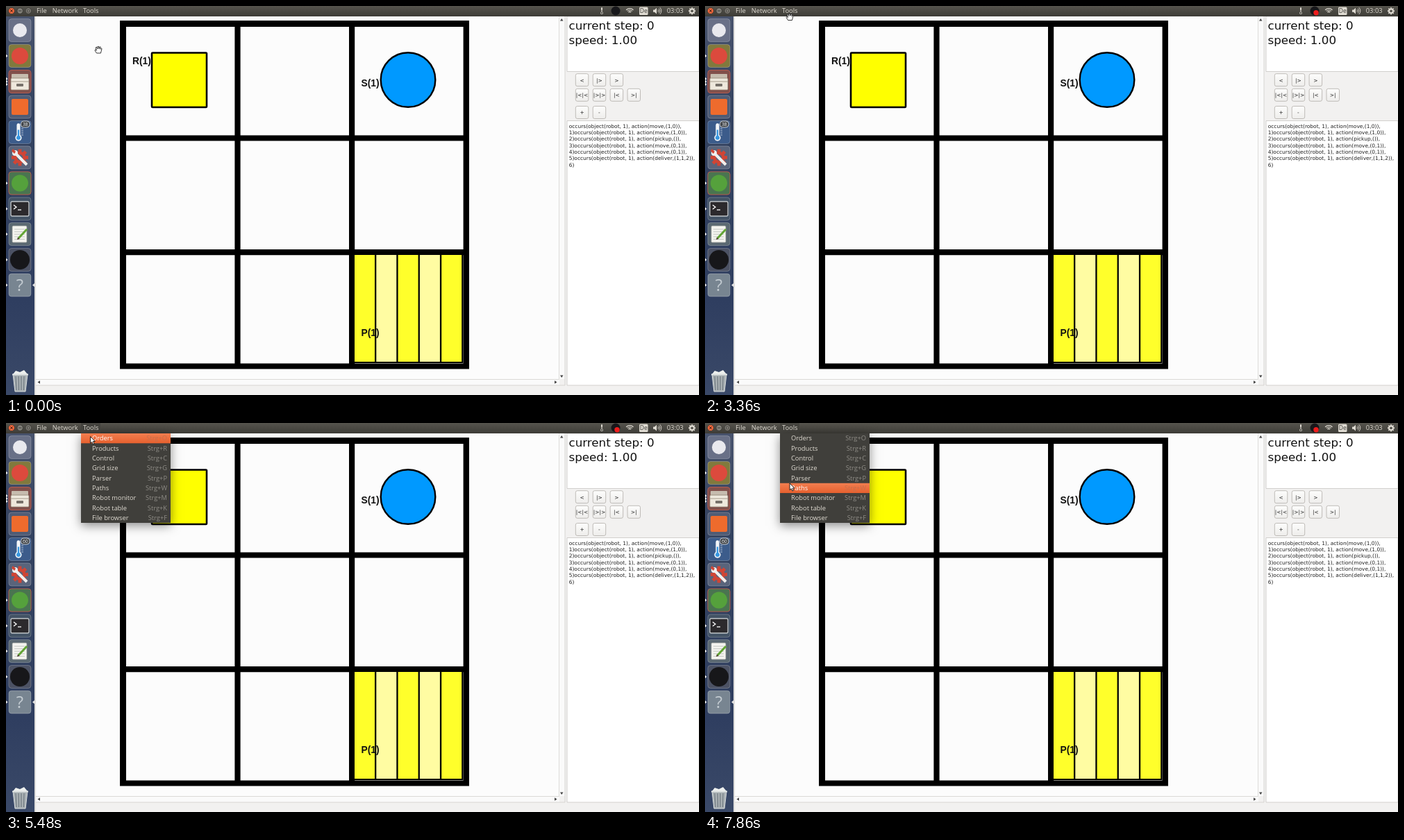
Animation, 998 px wide and 561 px high, one loop 8 s. Source, as an HTML page with a canvas:

```html
<!DOCTYPE html>
<html lang="en">
<head>
<meta charset="utf-8">
<title>Robot grid viewer</title>
<style>
html, body { margin: 0; width: 100%; height: 100%; overflow: hidden; background: #f2f1f0; }
canvas { display: block; }
</style>
</head>
<body>
<canvas id="stage" width="998" height="561"></canvas>
<script>
const ctx = document.getElementById('stage').getContext('2d');
const LOOP = 8000;
const UI = '9.3px "Open Sans", sans-serif';
const SMALL = '7.46px "DejaVu Sans", sans-serif';
const LABEL = 'bold 13.8px "Liberation Sans", Arial, sans-serif';

// Pointer path: time, x, y of the tip
const PATH = [
  [0, 133, 58.5], [720, 132, 54], [1380, 131, 52], [1840, 128, 37.5], [2120, 129, 24],
  [2400, 131, 16], [2640, 125, 13], [3200, 122, 11], [5060, 122, 11], [5480, 121.5, 19.5],
  [5860, 121, 30], [6140, 118.7, 54], [6700, 119, 56.5], [7440, 122, 87], [LOOP, 122, 87]
];
const ARROW_FROM = 3500, RECORD_FROM = 40, HOT_FROM = 5240;
const MENU_FROM = 4100, MENU_FULL = 4480;
const MENU = [['Orders', 'O'], ['Products', 'R'], ['Control', 'C'], ['Grid size', 'G'], ['Parser', 'P'],
  ['Paths', 'W'], ['Robot monitor', 'M'], ['Robot table', 'K'], ['File browser', 'F']];
const ROW = 14.35;
const PLAN = ['occurs(object(robot, 1), action(move,(1,0)),', '1)occurs(object(robot, 1), action(move,(1,0)),',
  '2)occurs(object(robot, 1), action(pickup,()),', '3)occurs(object(robot, 1), action(move,(0,1)),',
  '4)occurs(object(robot, 1), action(move,(0,1)),', '5)occurs(object(robot, 1), action(deliver,(1,1,2)),', '6)'];

function rect(x, y, w, h, fill, radius = 0, stroke, width = 1) {
  ctx.beginPath();
  ctx.roundRect(x, y, w, h, radius);
  paint(fill, stroke, width);
}
function disc(x, y, r, fill, stroke, width = 1) {
  ctx.beginPath();
  ctx.arc(x, y, r, 0, 7);
  paint(fill, stroke, width);
}
function shape(points, fill, stroke, width = 1, close = true) {
  ctx.beginPath();
  for (let i = 0; i < points.length; i += 2) ctx.lineTo(points[i], points[i + 1]);
  if (close) ctx.closePath();
  paint(fill, stroke, width);
}
function line(points, stroke, width = 1) { shape(points, null, stroke, width, false); }
function paint(fill, stroke, width) {
  if (fill) { ctx.fillStyle = fill; ctx.fill(); }
  if (stroke) { ctx.strokeStyle = stroke; ctx.lineWidth = width; ctx.stroke(); }
}
function text(str, x, y, font, fill, align = 'left') {
  ctx.font = font;
  ctx.fillStyle = fill;
  ctx.textAlign = align;
  ctx.fillText(str, x, y);
}
function fade(y0, y1, ...colors) {
  const g = ctx.createLinearGradient(0, y0, 0, y1);
  colors.forEach((c, i) => g.addColorStop(i / (colors.length - 1), c));
  return g;
}
function gear(x, y, r, color, hole) {
  for (let i = 0; i < 4; i++) {
    const a = i * Math.PI / 4, dx = Math.cos(a) * r, dy = Math.sin(a) * r;
    line([x - dx, y - dy, x + dx, y + dy], color, r * 0.4);
  }
  disc(x, y, r * 0.72, color);
  disc(x, y, r * 0.35, hole);
}

function drawGrid() {
  rect(43, 15, 754, 523, '#fcfcfc');
  rect(164, 21, 503, 502.5, '#000');
  for (let r = 0; r < 3; r++)
    for (let c = 0; c < 3; c++)
      rect(173 + c * 164.6, 30 + r * 164.6, 156.4, 156.4, '#fcfcfc');
  rect(500, 357, 158.5, 158, '#000');
  for (let i = 0; i < 5; i++)
    rect(502 + i * 31.3, 359, 29, 154, i % 2 ? '#fffca2' : '#ffff2b');
  rect(210, 67.5, 79, 78.5, '#ffff00', 1, '#000', 2.6);
  disc(579, 106.5, 39.3, '#0099ff', '#000', 2.4);
  text('R(1)', 182, 84, LABEL, '#111');
  text('S(1)', 511.5, 115.5, LABEL, '#111');
  text('P(1)', 511.5, 476, LABEL, '#111');
  // Scroll bars
  rect(797, 15, 8, 523, '#fafafa');
  rect(43, 538.5, 754, 8.5, '#fafafa');
  line([796.5, 15, 796.5, 538.5, 43, 538.5], '#d5d3d0', 0.8);
  line([805, 15, 805, 547, 43, 547], '#cfcdca', 0.8);
  shape([798, 21.5, 802.5, 21.5, 800.2, 18], '#444');
  shape([798, 532.5, 802.5, 532.5, 800.2, 536], '#444');
  shape([49, 540.3, 49, 544.8, 45.5, 542.5], '#444');
  shape([790, 540.3, 790, 544.8, 793.5, 542.5], '#444');
}

function button(str, x, y) {
  rect(x - 9.2, y - 9, 18.5, 18, fade(y - 9, y + 9, '#fdfdfc', '#eeedeb'), 2.5, '#b9b6b2', 0.9);
  text(str, x, y + 2.8, SMALL, '#222', 'center');
}
function drawSidePane() {
  rect(808, 15, 190, 79.5, '#fff', 0, '#c8c6c3', 0.8);
  const big = '16.7px "DejaVu Sans", sans-serif';
  text('current step: 0', 810.5, 34, big, '#111');
  text('speed: 1.00', 810.5, 54.5, big, '#111');
  [['<', '|>', '>'], ['|<|<', '|>|>', '|<', '>|'], ['+', '-']].forEach((row, r) =>
    row.forEach((str, c) => button(str, 829.5 + c * 24.9, [106.7, 128.3, 153.5][r])));
  rect(808, 165.5, 190, 381.5, '#fff', 0, '#c8c6c3', 0.8);
  PLAN.forEach((str, i) => text(str, 810.7, 175.7 + i * 9.33, SMALL, '#222'));
}

function tile(y, fill, edge = 'rgba(255,255,255,.22)') {
  rect(4, y - 16.5, 32, 33, fill, 4, edge, 1);
}
function thermometer(x, y, s, glass, fluid) {
  rect(x - 2.2 * s, y - 11 * s, 4.4 * s, 18 * s, glass, 2 * s);
  disc(x, y + 7 * s, 4 * s, glass);
  disc(x, y + 7 * s, 2.6 * s, fluid);
  rect(x - s, y - 3 * s, 2 * s, 9 * s, fluid);
}
function drawLauncher(t) {
  rect(0, 15, 41, 546, fade(15, 561, '#48536d', '#33425f', '#31405f', '#2f3e60', '#3a4968'));
  rect(41, 15, 2, 546, '#dedddb');

  tile(35, '#697087');
  disc(20, 35, 10, '#e9e9ee');
  tile(72, '#81793d');
  disc(20, 72, 12, '#dc4a3d');

  tile(109, '#81504b', '#b65b50');
  rect(8, 98, 24, 8, '#c6bcae', 1);
  rect(7, 104, 26, 17, '#eee8dc', 1.5, '#8d8272', 0.8);
  line([7, 109, 33, 109], '#a59b8c', 1);
  rect(15, 112, 10, 4, '#77716a', 1);

  tile(145.5, '#505c75');
  rect(8, 134, 24, 23, '#ee6b2d', 2);

  tile(182, '#3c5c8b');
  thermometer(18, 182, 1.15, '#f2f5f8', '#3897e0');
  for (let i = 0; i < 5; i++) line([22, 174 + i * 3, 25, 174 + i * 3], '#cdd8e8', 0.8);
  rect(21.5, 166, 12.5, 9, '#3c4045', 4, '#d6d9dd', 0.9);
  text(t < HOT_FROM ? '38' : '60', 27.8, 173, '6.8px "Open Sans", sans-serif', '#fff', 'center');

  tile(218.5, '#59647b');
  gear(20, 218.5, 12, '#d04535', '#59647b');
  line([12, 211, 30, 229], '#f0f0ee', 4);
  disc(13, 212, 4, '#f0f0ee');
  shape([8, 209, 12, 213, 14, 210, 10, 206], '#d04535');

  tile(255.5, '#4a7450', '#b45b4c');
  disc(20, 255.5, 12, '#55a13c');

  tile(292.5, '#435365');
  rect(7, 282, 26, 21, '#2c2a2d', 2, '#bfc3c6', 1.4);
  line([11, 287, 15, 290, 11, 293], '#fff', 1.3);
  line([17, 294, 22, 294], '#fff', 1.3);

  tile(329, '#5b6972');
  rect(9, 317, 21, 24, '#f4f4ef', 1.5, '#8d9490', 0.8);
  for (let i = 0; i < 5; i++) line([12, 322 + i * 3.6, 27, 322 + i * 3.6], '#b5bab5', 0.8);
  line([30, 322, 18, 335], '#62a534', 3);
  shape([16, 337, 17, 333.5, 19.5, 336], '#4a3a28');

  tile(366, '#4c5264');
  disc(20, 366, 14, '#17171a');

  tile(402.5, '#788591');
  text('?', 20, 411, '24px "Open Sans", sans-serif', '#c4ccd2', 'center');

  shape([10, 531, 31, 531, 28, 556, 13, 556], '#a9b0b3', '#d9dddd', 1);
  for (let i = 0; i < 4; i++) line([14 + i * 4, 534, 15 + i * 3.5, 554], '#667078', 1);
  shape([10, 531, 14, 526, 20, 528, 26, 525, 31, 531], '#ecefed');
  line([9, 531.5, 32, 531.5], '#dfe3e2', 2);

  for (const y of [72, 105, 109, 113, 255.5, 292.5, 329, 366, 402.5])
    shape([0, y - 2.3, 2.6, y, 0, y + 2.3], '#e8e8e8');
  shape([41, 400, 38, 402.5, 41, 405], '#e8e8e8');
}

function drawTopBar(t) {
  const ink = '#dfdbd2';
  rect(0, 0, 998, 15, fade(0, 15, '#56544d', '#3d3c37'));
  disc(8, 7, 4.5, '#ee683d', '#34332f', 0.8);
  line([6.2, 5.2, 9.8, 8.8], '#4b2318', 1);
  line([9.8, 5.2, 6.2, 8.8], '#4b2318', 1);
  disc(20.2, 7, 4.2, '#83817a', '#34332f', 0.8);
  line([18, 7, 22.4, 7], '#3b3a36', 1);
  disc(32.3, 7, 4.2, '#83817a', '#34332f', 0.8);
  rect(30.5, 5.4, 3.6, 3.4, null, 0, '#3b3a36', 0.8);
  if (t >= MENU_FROM) rect(108, 0, 28, 15, '#45443f');
  [['File', 44], ['Network', 66.7], ['Tools', 111]].forEach(([str, x]) => text(str, x, 10.4, UI, ink));

  thermometer(858, 7, 0.45, ink, '#55534d');
  disc(878, 7, 6.5, '#17171a');
  if (t >= RECORD_FROM) disc(880, 9.7, 3.7, '#ee1c1c');
  for (const r of [2.6, 5, 7.4]) {
    ctx.beginPath();
    ctx.arc(898.3, 11, r, -2.35, -0.79);
    paint(null, ink, 1.2);
  }
  rect(912, 1.5, 12.5, 11.5, ink, 1.5);
  text('De', 918.2, 10.3, '8.5px "Open Sans", sans-serif', '#3c3b37', 'center');
  shape([932, 5.5, 934, 5.5, 937, 2.8, 937, 11.4, 934, 8.8, 932, 8.8], ink);
  for (const r of [2.5, 4.6, 6.8]) {
    ctx.beginPath();
    ctx.arc(937, 7.1, r, -0.8, 0.8);
    paint(null, ink, 0.9);
  }
  text('03:03', 951.8, 10.4, UI, ink);
  gear(988, 7.2, 5, ink, '#4a4842');
}

function drawMenu(t, tipY) {
  const alpha = Math.min(1, (t - MENU_FROM) / (MENU_FULL - MENU_FROM));
  if (alpha <= 0) return;
  ctx.save();
  ctx.globalAlpha = alpha;
  ctx.shadowColor = 'rgba(0,0,0,.45)';
  ctx.shadowBlur = 14;
  ctx.shadowOffsetY = 4;
  rect(108, 15, 129, 129, '#403f3b');
  ctx.shadowColor = 'transparent';
  const hover = Math.floor((tipY - 15) / ROW);
  MENU.forEach(([name, key], i) => {
    const y = 15 + i * ROW, on = i === hover;
    if (on) rect(108, y, 129, ROW, fade(y, y + ROW, '#f27e50', '#e6602e'));
    text(name, 124, y + 10.3, UI, on ? '#fff' : '#dfdbd2');
    text('Strg+' + key, 232, y + 10.3, UI, on ? '#c7704c' : '#8e8c86', 'right');
  });
  ctx.restore();
}

function drawPointer(t, x, y) {
  ctx.save();
  ctx.translate(x, y);
  ctx.lineJoin = 'round';
  if (t >= ARROW_FROM) {
    shape([0, 0, 0, 9.6, 2.2, 7.6, 3.8, 11, 5.5, 10.2, 4, 7, 6.8, 7], '#fff', '#111', 0.9);
  } else {
    shape([-2.5, 9.5, -5, 5.5, -4.2, 4.3, -2.6, 5.6, -3.9, 1.5, -2.6, 0.6, -1.2, 3.5, -1, -0.1,
      0.6, -0.1, 1, 3.2, 2, 0.3, 3.3, 0.8, 3, 3.8, 4.2, 2.4, 5, 3.2, 3.4, 9.5], '#fff', '#222', 0.9);
  }
  ctx.restore();
}

function pointerAt(t) {
  const i = PATH.findIndex(p => p[0] > t);
  const [t0, x0, y0] = PATH[i - 1], [t1, x1, y1] = PATH[i];
  const k = (t - t0) / (t1 - t0);
  return [x0 + (x1 - x0) * k, y0 + (y1 - y0) * k];
}

function draw() {
  const t = performance.now() % LOOP;
  const [x, y] = pointerAt(t);
  rect(0, 0, 998, 561, '#f2f1f0');
  drawGrid();
  drawSidePane();
  drawLauncher(t);
  drawTopBar(t);
  drawMenu(t, y);
  drawPointer(t, x, y);
  requestAnimationFrame(draw);
}
draw();
</script>
</body>
</html>
```
